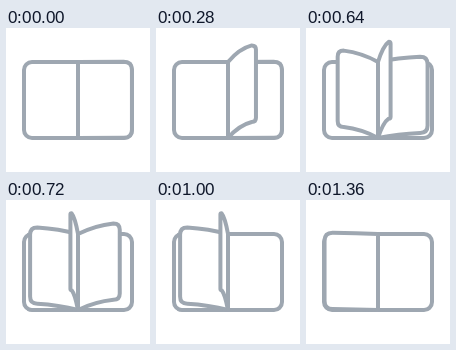
Write an HTML page that moves like this. It is 144x144 px and loops after 1.4 s.

```html
<!DOCTYPE html>
<html lang="en">
<head>
<meta charset="utf-8">
<title>Turning pages</title>
<style>
  html, body { margin: 0; width: 100%; height: 100%; overflow: hidden; background: #fff; }
  svg { display: block; width: 100vw; height: 100vh; }
  rect, path { fill: #fff; stroke: #9ea7b1; stroke-width: 4; stroke-linejoin: round; stroke-linecap: round; }
</style>
</head>
<body>
<svg viewBox="0 0 144 144">
  <rect x="18" y="34" width="108" height="76" rx="8"/>
  <path d="M72 34V110"/>
  <g id="pages"></g>
</svg>
<script>
  const LOOP = 1400, STEP = 40, STAGGER = 280, TURN = 830;
  const SPINE = 72, TOP = 34, BOTTOM = 110, WIDTH = 54, LIFT = 21;
  const group = document.getElementById('pages');
  const paths = [0, 1, 2].map(() =>
    group.appendChild(document.createElementNS('http://www.w3.org/2000/svg', 'path')));

  // The page slows down at the half-open pose on either side.
  function pageAngle(u) {
    const degrees = 2.5 + 177.5 * u + 4 * Math.sin(4 * Math.PI * u);
    return degrees * Math.PI / 180;
  }

  function pagePath(angle) {
    const w = WIDTH * Math.cos(angle);
    const lift = LIFT * Math.pow(Math.sin(angle), 1.5);
    const r = Math.abs(w) * 0.15;
    const x = SPINE + w, inner = SPINE + w * 0.85;
    const c1 = SPINE + w * 0.25, c2 = SPINE + w * 0.55;
    const y1 = TOP - lift, y2 = BOTTOM - lift * 0.96;
    const mix = (a, b, k) => a + (b - a) * k;
    return `M${SPINE} ${TOP}` +
      `C${c1} ${mix(TOP, y1, 0.5)} ${c2} ${mix(TOP, y1, 0.87)} ${inner} ${y1}` +
      `Q${x} ${y1} ${x} ${y1 + r}V${y2 - r}Q${x} ${y2} ${inner} ${y2}` +
      `C${c2} ${mix(BOTTOM, y2, 0.87)} ${c1} ${mix(BOTTOM, y2, 0.5)} ${SPINE} ${BOTTOM}Z`;
  }

  function draw() {
    const t = Math.floor((performance.now() % LOOP) / STEP) * STEP;
    const turning = [0, 1, 2]
      .map(i => (t - i * STAGGER) / TURN)
      .filter(u => u >= 0 && u < 1)
      .map(pageAngle);
    // Left pages stack upwards as they land; right pages stack the other way.
    const left = turning.filter(a => a > Math.PI / 2);
    const right = turning.filter(a => a <= Math.PI / 2).reverse();
    const order = left.concat(right);
    paths.forEach((p, i) => p.setAttribute('d', i < order.length ? pagePath(order[i]) : ''));
    requestAnimationFrame(draw);
  }
  draw();
</script>
</body>
</html>
```
